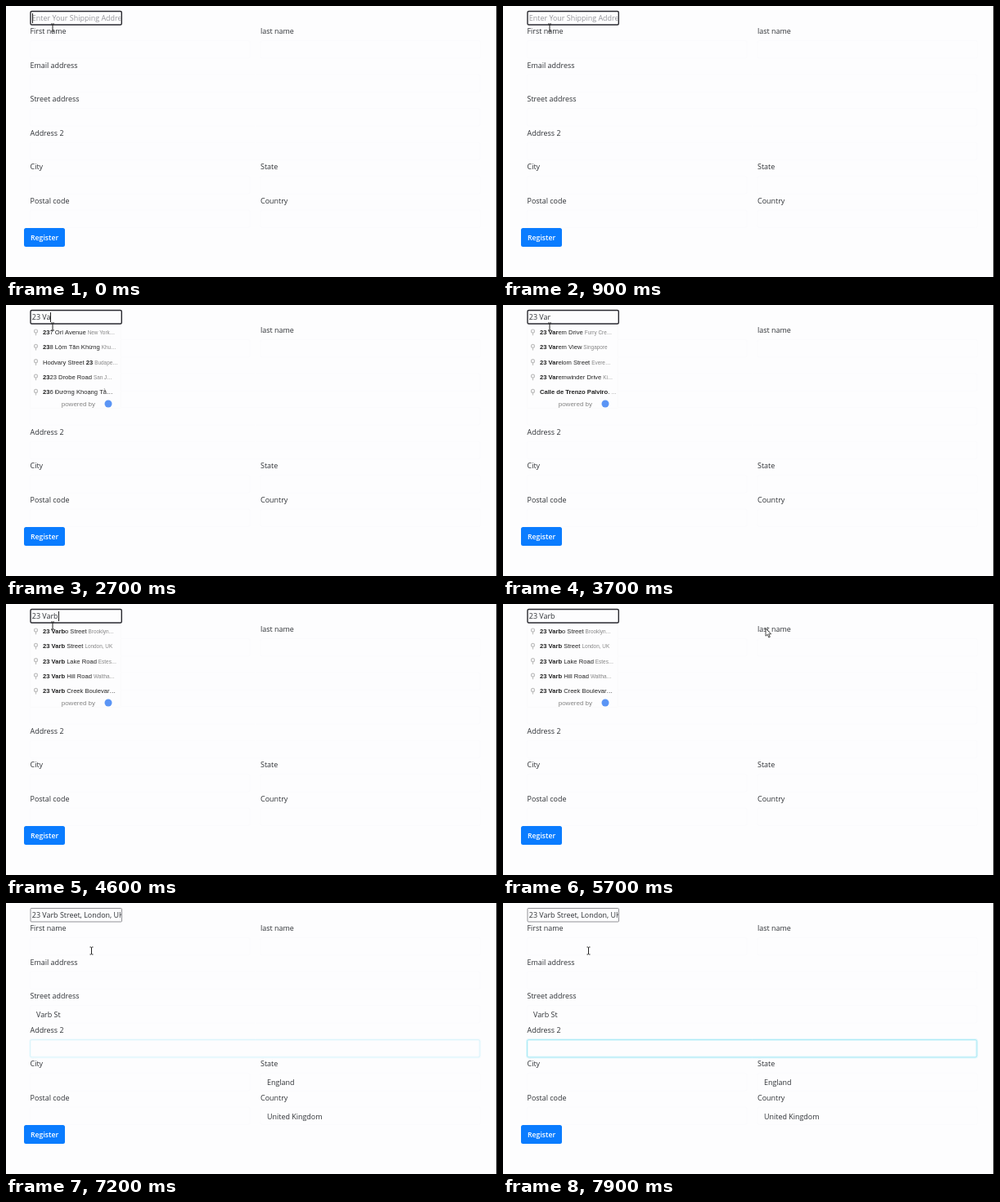
Animation of 600 by 332 pixels, one loop 8 s. Source, as an HTML page with a canvas:

```html
<!DOCTYPE html>
<html lang="en">
<head>
<meta charset="utf-8">
<title>Address form</title>
<style>
html, body { margin: 0; width: 100%; height: 100%; overflow: hidden; background: #fdfdfe; }
canvas { display: block; width: 600px; height: 332px; }
</style>
</head>
<body>
<canvas id="stage"></canvas>
<script>
const LOOP = 8000, STEP = 100;
const canvas = document.getElementById('stage');
const ctx = canvas.getContext('2d');
const ratio = window.devicePixelRatio || 1;
canvas.width = 600 * ratio;
canvas.height = 332 * ratio;

const UI = '"Open Sans", "Noto Sans", sans-serif';
const LIST = '"Liberation Sans", Arial, sans-serif';
const INK = '#2f3236';
const PICK = 7000, FILL = 7200, BLINK = 530;

const labels = [
  ['First name', 'last name'], ['Email address'], ['Street address'],
  ['Address 2'], ['City', 'State'], ['Postal code', 'Country']
];
const columns = [29.5, 311];

const typed = [[1700, '2'], [1900, '23'], [2000, '23 '], [2600, '23 V'],
  [2700, '23 Va'], [2800, '23 Var'], [4100, '23 Varb']];

// Asterisks enclose bold parts; a bar separates the street from the town.
const results = [
  [2000, ['*23*7 Orl Avenue|New York…', '*23*8 Lộm Tăn Khừng|Khu…', 'Hodvary Street *23*|Budape…',
    '*23*23 Drobe Road|San J…', '*23*6 Đường Khoạng Tằ…|']],
  [3000, ['*23 Var*em Drive|Furry Cre…', '*23 Var*em View|Singapore', '*23 Var*elom Street|Evere…',
    '*23 Var*emwinder Drive|Ki…', '*Calle de Trenzo Palviro*.|…']],
  [4300, ['*23 Varb*o Street|Brooklyn…', '*23 Varb* Street|London, UK', '*23 Varb* Lake Road|Estes…',
    '*23 Varb* Hill Road|Waltha…', '*23 Varb* Creek Boulevar…|']]
];

const path = [[0, 57, 26.5], [5400, 57, 26.5], [5700, 321, 30], [5900, 321, 30],
  [6600, 103, 41], [6700, 104.5, 58.5], [LOOP, 104.5, 58.5]];

const latest = (list, t) => list.filter(item => item[0] <= t).pop();

function text(str, x, y, font, color) {
  ctx.font = font;
  ctx.fillStyle = color;
  ctx.fillText(str, x, y);
  return x + ctx.measureText(str).width;
}

function box(x, y, w, h, r, fill, stroke, line = 1) {
  ctx.beginPath();
  ctx.roundRect(x, y, w, h, r);
  if (fill) { ctx.fillStyle = fill; ctx.fill(); }
  if (stroke) { ctx.strokeStyle = stroke; ctx.lineWidth = line; ctx.stroke(); }
}

function form(t) {
  const font = '8.95px ' + UI;
  labels.forEach((row, i) => {
    const y = 34.2 + 41.5 * i;
    row.forEach((label, c) => {
      const w = row.length > 1 ? 268.5 : 549.5;
      box(columns[c], y + 8.3, w, 21.5, 2, null, '#fbfbfd');
      text(label, columns[c], y, font, INK);
    });
  });
  box(22, 272, 50, 23, 2.5, '#0a7cff');
  text('Register', 30, 287.3, '600 8.7px ' + UI, '#fff');
  if (t >= FILL) {
    text('Varb St', 37, 140.2, font, INK);
    text('England', 319, 223.2, font, INK);
    text('United Kingdom', 319, 264.8, font, INK);
    ctx.save();
    ctx.globalAlpha = Math.min(1, (t - FILL + 50) / 150);
    box(29.5, 167.5, 549.5, 21.5, 2, null, 'rgba(130,225,245,.22)', 3);
    box(29.5, 167.5, 549.5, 21.5, 2, null, '#aeeaf5');
    ctx.restore();
  }
}

function pin(x, y) {
  ctx.strokeStyle = '#c0c0c0';
  ctx.lineWidth = 1.2;
  ctx.beginPath();
  ctx.arc(x, y - 1.2, 2, 0, 7);
  ctx.moveTo(x, y + 1);
  ctx.lineTo(x, y + 4);
  ctx.stroke();
}

function resultRow(row, y) {
  const [street, town] = row.split('|');
  let x = 45;
  street.split('*').forEach((part, i) => {
    x = text(part, x, y + 2.8, (i % 2 ? 'bold ' : '') + '7.6px ' + LIST, '#222');
  });
  text(town, x + 2, y + 2.8, '6.4px ' + LIST, '#858585');
}

function dropdown(t) {
  const found = latest(results, t);
  if (!found || t >= PICK) return;
  box(29.5, 24.5, 111, 102, 0, '#fdfdfe', '#fafafb');
  ctx.save();
  ctx.beginPath();
  ctx.rect(30, 24, 109, 103);
  ctx.clip();
  found[1].forEach((row, i) => {
    const y = 33.2 + 18.35 * i;
    pin(36.5, y);
    resultRow(row, y);
  });
  text('powered by', 67.7, 123.6, '8px ' + LIST, '#858585');
  ctx.fillStyle = '#5b95f5';
  ctx.beginPath();
  ctx.arc(125, 121, 4.5, 0, 7);
  ctx.fill();
  ctx.restore();
}

function caretOn(t, key) {
  if (!key) return t < 400 || (t >= 1000 && t < 1400);
  return Math.floor((t - key[0]) / BLINK) % 2 === 0;
}

function search(t) {
  const focused = t < PICK, key = latest(typed, t);
  if (focused) box(30, 6.5, 111.3, 16.5, 1.5, '#fdfdfe', '#2a2a30', 1.4);
  else box(30, 6.5, 111.5, 16.5, 1, '#fdfdfe', '#929297');
  ctx.save();
  ctx.beginPath();
  ctx.rect(31, 7, 109.5, 16);
  ctx.clip();
  const value = focused ? (key ? key[1] : '') : '23 Varb Street, London, UK';
  const font = '8.95px ' + UI;
  const end = text(value, 31.8, 18.3, font, INK);
  if (!value) text('Enter Your Shipping Address', 31.8, 18.3, font, '#96969b');
  if (focused && caretOn(t, key)) {
    ctx.fillStyle = '#222';
    ctx.fillRect(Math.round(end), 9, 1, 12);
  }
  ctx.restore();
}

function pointer(t) {
  const i = path.findIndex(p => p[0] > t);
  const [t0, x0, y0] = path[i - 1], [t1, x1, y1] = path[i];
  const k = (t - t0) / (t1 - t0);
  const x = x0 + (x1 - x0) * k, y = y0 + (y1 - y0) * k;
  ctx.save();
  ctx.translate(x, y);
  ctx.strokeStyle = '#222';
  ctx.lineWidth = 1;
  if (t <= 5400 || t >= PICK) {
    ctx.stroke(new Path2D('M-2-4.5H-.6L0-4 .6-4.5H2M0-4V4M-2 4.5H-.6L0 4 .6 4.5H2'));
  } else {
    const arrow = new Path2D('M0 0V9.2L2.2 7.3 3.8 11 5.3 10.3 3.7 6.8H6.6Z');
    ctx.fillStyle = '#fff';
    ctx.fill(arrow);
    ctx.lineWidth = .8;
    ctx.stroke(arrow);
  }
  ctx.restore();
}

function draw(now) {
  const t = Math.floor((now % LOOP) / STEP) * STEP;
  ctx.setTransform(ratio, 0, 0, ratio, 0, 0);
  ctx.fillStyle = '#fdfdfe';
  ctx.fillRect(0, 0, 600, 332);
  form(t);
  dropdown(t);
  search(t);
  pointer(t);
  ctx.fillStyle = '#3a3a3a';
  ctx.fillRect(599, 0, 1, 332);
}

const start = performance.now();
function tick() {
  draw(performance.now() - start);
  requestAnimationFrame(tick);
}
tick();
</script>
</body>
</html>
```
